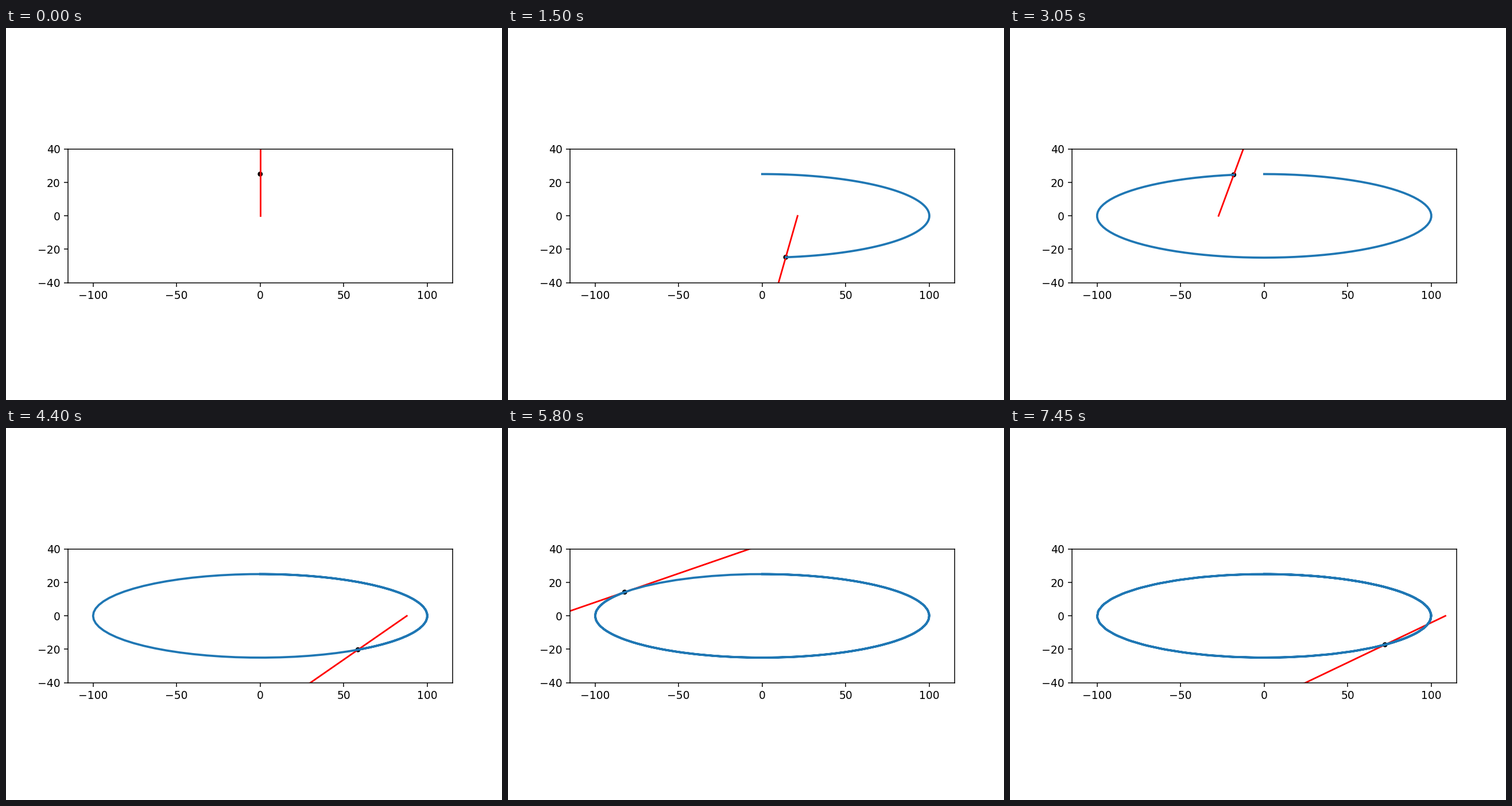
A matplotlib script that plays this animation: 864x648 px, repeating every 7500 ms.

```python
import numpy as np
import matplotlib.pyplot as plt
from matplotlib.animation import FuncAnimation

A, B = 100, 25          # semi-axes of the ellipse
FRAMES, STEP = 150, 0.1


def point(t):
    return A * np.sin(t), B * np.cos(t)


fig, ax = plt.subplots(figsize=(6.4, 4.8), dpi=135)
ax.set_aspect('equal')
ax.set_xlim(-115, 115)
ax.set_ylim(-40, 40)

dot = ax.add_patch(plt.Circle(point(0), 1.5, fc='k'))
rod, = ax.plot([], [], color='red', lw=1.5)
trail, = ax.plot([], [], color='C0', lw=2)


def update(i):
    t = i * STEP
    x, y = point(t)
    dot.center = x, y
    # the rod's ends slide along the two axes
    rod.set_data([0, 1.5 * x], [3 * y, 0])
    # always 100 samples, so the trail grows coarser with time
    trail.set_data(*point(np.linspace(0, t, 100)))
    return dot, rod, trail


anim = FuncAnimation(fig, update, frames=FRAMES, interval=50,
                     repeat=True, repeat_delay=0)
plt.show()
```
